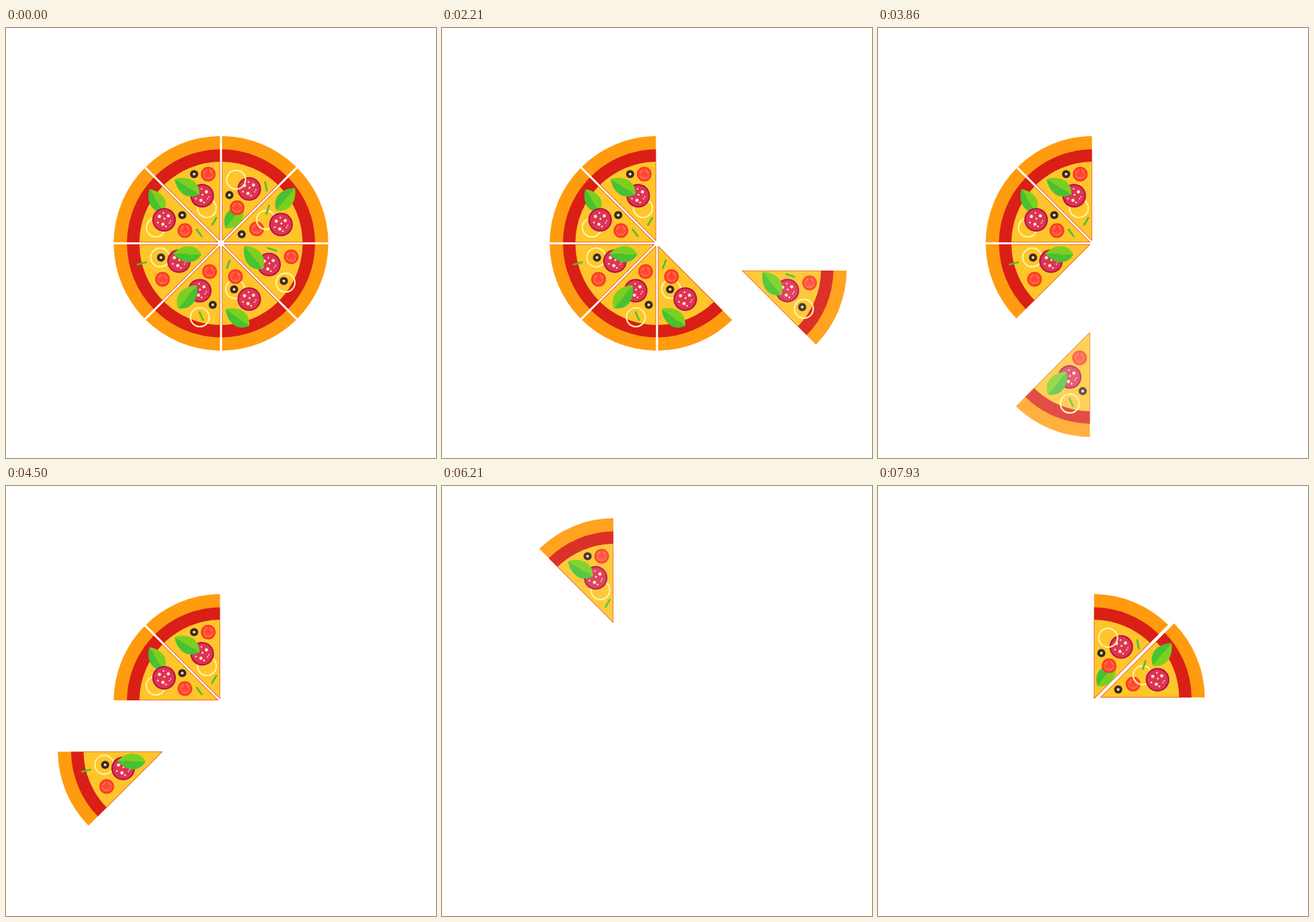
These frames come from a looping animation (640x640 px, 8 s). An HTML page:

```html
<!DOCTYPE html>
<html lang="en">
<head>
<meta charset="utf-8">
<title>Pizza slices</title>
<style>
html, body { margin: 0; width: 100%; height: 100%; overflow: hidden; background: #fff; }
svg { display: block; width: 100%; height: 100%; }
</style>
</head>
<body>
<svg id="stage" viewBox="0 0 640 640"></svg>
<script>
const LOOP = 8000, CX = 320, CY = 320.5;
const clamp = v => Math.min(1, Math.max(0, v));
const circle = (x, y, r, attrs) => `<circle cx="${x}" cy="${y}" r="${r}" ${attrs}/>`;
const fill = c => `fill="${c}"`;

// Sector i of eight, inset by gap from both cutting lines.
function sector(i, r, gap, color) {
  const a = i * Math.PI / 4, b = a + Math.PI / 4, d = Math.asin(gap / r);
  const at = (t, q) => `${(CX + q * Math.sin(t)).toFixed(2)} ${(CY - q * Math.cos(t)).toFixed(2)}`;
  return `<path d="M${at((a + b) / 2, gap / Math.sin(Math.PI / 8))}L${at(a + d, r)}` +
    `A${r} ${r} 0 0 1 ${at(b - d, r)}Z" ${fill(color)}/>`;
}

const onion = (x, y) => circle(x, y, 14, 'fill="none" stroke="#fff3a3" stroke-width="2.2"');
const olive = (x, y) => circle(x, y, 6.1, fill('#3a2a20')) + circle(x, y, 2.1, fill('#ffe0a0'));
const stick = (x1, y1, x2, y2) =>
  `<path d="M${x1} ${y1}L${x2} ${y2}" stroke="#4cc22d" stroke-width="2.7" stroke-linecap="round"/>`;
const use = id => (x, y) => `<use href="#${id}" x="${x}" y="${y}"/>`;
const salami = use('salami'), tomato = use('tomato');

// Leaf from its tip to its stem; side = -1 swaps the light half.
function leaf(x1, y1, x2, y2, side = 1) {
  const len = Math.hypot(x2 - x1, y2 - y1), turn = Math.atan2(y2 - y1, x2 - x1) * 180 / Math.PI;
  const half = (s, color) =>
    `<path d="M0 0C.22 ${s * .27} .72 ${s * .47} 1 0Z" ${fill(color)}/>`;
  return `<g transform="translate(${x1} ${y1}) rotate(${turn}) scale(${len} ${len * side})">` +
    half(1, '#46c232') + half(-1, '#7ad01e') + '</g>';
}

const spots = [[-7, -5, 2.4], [6.3, -5.8, 2.4], [-1, -10.3, 1.2], [.5, -1.5, 1.4], [-9.2, 4, 1.3],
  [-1.8, 6.7, 2.4], [2.8, 10, 1.3], [8, 4.5, 1], [9.8, 1.6, 1]];
const seeds = [-150, -120, -60, -30, 30, 62, 90, 118, 150];

const defs = `<defs>
  <g id="salami">${circle(0, 0, 17.6, fill('#b5143c'))}${circle(0, 0, 15.4, fill('#de3358'))}
    ${spots.map(([x, y, r]) => circle(x, y, r, fill('#ffedb9'))).join('')}</g>
  <g id="tomato">${circle(0, 0, 11, fill('#ff3a20'))}${circle(0, 0, 8.5, fill('#ff5238'))}
    <path d="M0 -8V-2L-5 4M0 -2L5 4" fill="none" stroke="#ff3a20" stroke-width="1.3"/>
    ${seeds.map(d => circle((6.3 * Math.cos(d * Math.PI / 180)).toFixed(1),
      (6.3 * Math.sin(d * Math.PI / 180)).toFixed(1), .8, fill('#ffa080'))).join('')}</g>
</defs>`;

// Clockwise from the top: flight offset and toppings in painting order.
const slices = [
  { fly: [61, -146], top: [salami(362, 239.5), onion(342.5, 225.8), stick(385.7, 229.5, 388.3, 242),
    olive(332.5, 248.7), leaf(353, 264, 327, 298), tomato(344, 267.5)] },
  { fly: [142, -87], top: [leaf(430, 238, 402.5, 271.5), tomato(373, 299), onion(387, 285.7),
    salami(409.3, 292.5), stick(391.5, 264.5, 387.5, 276.5), olive(350.8, 307)] },
  { fly: [153, 48.5], top: [salami(391.5, 352), leaf(355, 324, 382, 359), stick(389.8, 327.5, 402, 331.5),
    tomato(424.5, 340.5), onion(416, 379), olive(413.5, 376.5)] },
  { fly: [127, 139], top: [stick(333, 346, 328.8, 357.5), onion(341, 388.5), tomato(341.5, 370),
    olive(339.5, 389), salami(362, 403.5), leaf(327, 418, 362, 443.5)] },
  { fly: [-3.5, 148], top: [tomato(303, 362.5), salami(288.3, 391), leaf(284, 383, 256, 417, -1),
    olive(307.7, 412), onion(288.5, 430.5), stick(288, 423, 293.3, 434.5)] },
  { fly: [-127, 112], top: [stick(196, 352, 208.5, 348.7), onion(229.5, 341.5), olive(230.7, 341.7),
    salami(257.5, 347), leaf(249, 336, 291, 337), tomato(233, 374)] },
  { fly: [-148.5, -34], top: [onion(223, 297), leaf(213.5, 240, 235, 274), salami(235.3, 285.5),
    olive(262.3, 278.5), tomato(266.3, 301.5), stick(283.8, 300, 291.3, 310)] },
  { fly: [-79, -141], top: [olive(280, 217.5), tomato(301, 217.5), onion(299, 268),
    salami(292, 249.7), leaf(251, 225, 288, 247.5), stick(313, 282.5, 306.8, 293)] }
];

const stage = document.getElementById('stage');
stage.innerHTML = defs + slices.map((s, i) => '<g>' +
  sector(i, 159.7, 1.6, '#ff9b0e') + sector(i, 140, 1.6, '#d91f16') +
  sector(i, 121.5, 2.1, '#ffc52b') + s.top.join('') + '</g>').join('');
const groups = stage.querySelectorAll(':scope > g');

// Distance from rest (0..1) and opacity of slice i at time t.
function pose(i, t) {
  const back = t - 6440 - 810 * i;
  if (back >= 0) return [1 - clamp(back / 715), clamp(back / 400)];
  const out = t - 800 * i;
  return [clamp((out - 10) / 750), 1 - clamp((out - 580) / 380)];
}

function draw(t) {
  slices.forEach(({ fly: [x, y] }, i) => {
    const [far, alpha] = pose(i, t), g = groups[i];
    g.setAttribute('transform', `translate(${(x * far).toFixed(2)} ${(y * far).toFixed(2)})`);
    g.setAttribute('opacity', alpha.toFixed(3));
  });
}

const start = performance.now();
function tick() {
  draw((performance.now() - start) % LOOP);
  requestAnimationFrame(tick);
}
tick();
</script>
</body>
</html>
```
